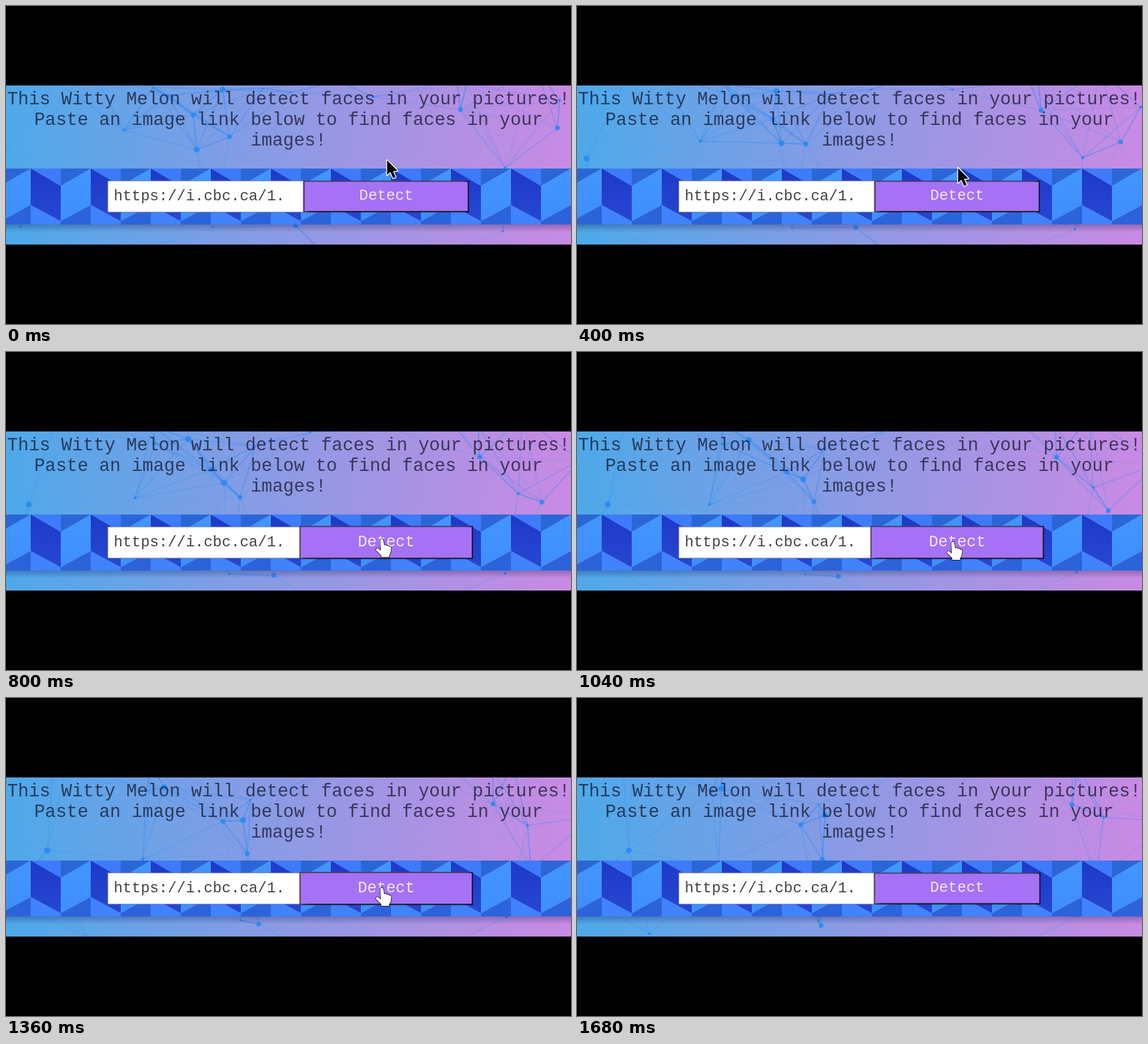
An HTML page with a canvas that plays this animation: 960x540 px, repeating every 1760 ms.

```html
<!DOCTYPE html>
<html lang="en">
<head>
<meta charset="utf-8">
<title>Face detection form</title>
<style>
  html, body { margin: 0; width: 100%; height: 100%; overflow: hidden; background: #000; }
  canvas { display: block; }
</style>
</head>
<body>
<canvas id="stage" width="960" height="540"></canvas>
<script>
const ctx = document.getElementById('stage').getContext('2d');
const LOOP = 1760, STEP = 80;
const PANEL = { top: 134.75, bottom: 405.25 };
const BAND = { top: 276, bottom: 371 };
const MONO = '"Courier New", "Liberation Mono", monospace';
const LINK_RANGE = 205;

let seed = 11;
function random(min, max) {
  seed = (seed * 16807) % 2147483647;
  return min + (max - min) * seed / 2147483647;
}

// Velocities are in px/s.
const particle = (x, y, vx, vy, r = 4) => ({ x, y, vx, vy, r });
const particles = [
  particle(368, 142, -73, 7, 5),
  particle(324, 244, 58, -27, 5),
  particle(318, 185, 37, 18),
  particle(380, 222, 22, 31),
  particle(772, 176, 41, 3),
  particle(937, 207, -33, 60),
  particle(492, 373, -46, 8),
  particle(-6, 259, 56, 0, 5),
  particle(200, 211, 24, 46, 2.5),
  particle(848, 275, 28, -43, 2.5)
];
for (let i = 0; i < 18; i++) {
  const y = i % 3 ? random(100, 165) : random(375, 440);
  particles.push(particle((i + random(0, 1)) * 55, y, random(-45, 45), random(-30, 30), random(1.5, 2.8)));
}

function ease(t, from, to) {
  const u = Math.min(1, Math.max(0, (t - from) / (to - from)));
  return u * u * (3 - 2 * u);
}

function polygon(color, points) {
  ctx.beginPath();
  points.forEach(([x, y]) => ctx.lineTo(x, y));
  ctx.closePath();
  ctx.fillStyle = color;
  ctx.fill();
}

function label(text, x, y, size, color, align = 'center') {
  ctx.font = `${size}px ${MONO}`;
  ctx.textAlign = align;
  ctx.fillStyle = color;
  ctx.fillText(text, x, y);
}

function fade(x0, y0, x1, y1, ...colors) {
  const gradient = ctx.createLinearGradient(x0, y0, x1, y1);
  colors.forEach((color, i) => gradient.addColorStop(i / (colors.length - 1), color));
  return gradient;
}

function drawBackground() {
  ctx.fillStyle = fade(0, 286, 960, 262, '#4da9e9', '#8e9ae4', '#c98ae3');
  ctx.fillRect(0, PANEL.top, 960, PANEL.bottom - PANEL.top);
}

function drawNetwork(t) {
  const nodes = particles.map(p => ({ x: p.x + p.vx * t / 1000, y: p.y + p.vy * t / 1000, r: p.r }));
  ctx.lineWidth = 2.2;
  nodes.forEach((a, i) => {
    for (const b of nodes.slice(i + 1)) {
      const near = 1 - Math.hypot(a.x - b.x, a.y - b.y) / LINK_RANGE;
      if (near <= 0) continue;
      ctx.strokeStyle = `rgba(40,135,240,${0.6 * near})`;
      ctx.beginPath();
      ctx.moveTo(a.x, a.y);
      ctx.lineTo(b.x, b.y);
      ctx.stroke();
    }
  });
  ctx.fillStyle = 'rgba(36,138,245,.85)';
  for (const { x, y, r } of nodes) {
    ctx.beginPath();
    ctx.arc(x, y, r, 0, Math.PI * 2);
    ctx.fill();
  }
}

function drawBand() {
  const { top, bottom } = BAND;
  const half = 51, rise = 29.5, side = top + 2 * rise + 3, front = side + rise - 2;
  ctx.fillStyle = fade(0, bottom, 0, bottom + 13, 'rgba(0,0,50,.26)', 'rgba(0,0,50,0)');
  ctx.fillRect(0, bottom, 960, 13);
  ctx.save();
  ctx.beginPath();
  ctx.rect(0, top, 960, bottom - top);
  ctx.clip();
  const dark = fade(0, top, 0, bottom, '#1d39c8', '#2748d2');
  const light = fade(0, top, 0, bottom, '#4296ff', '#3e8dfb');
  for (let x = -60; x < 960; x += half * 2) {
    const edge = x + half, end = edge + half;
    polygon('#3d7bfb', [[x, top], [edge, top], [edge, top + rise]]);
    polygon('#2b66d8', [[edge, top], [end, top], [edge, top + rise]]);
    polygon(dark, [[x, top], [edge, top + rise], [edge, front], [x, side]]);
    polygon(light, [[edge, top + rise], [end, top], [end, side], [edge, front]]);
    polygon('#4083fc', [[x, side], [edge, front], [edge, bottom], [x, bottom]]);
    polygon('#2c62da', [[end, side], [end, bottom], [edge, bottom], [edge, front]]);
  }
  ctx.restore();
}

function drawForm(t) {
  ctx.fillStyle = '#777b88';
  ctx.fillRect(172.5, 296.5, 333, 54);
  ctx.fillStyle = '#fff';
  ctx.fillRect(173.5, 297.5, 331, 52);
  label('https://i.cbc.ca/1.', 183, 330, 25.5, '#444', 'left');

  const scale = 1 + 0.05 * (ease(t, 480, 640) - ease(t, 1520, 1730));
  const w = 140.5, h = 26.8, border = 2;
  ctx.save();
  ctx.translate(646, 323.4);
  ctx.scale(scale, scale);
  polygon('#4b3c68', [[-w, -h], [w, -h], [-w, h]]);
  polygon('#17101f', [[w, -h], [w, h], [-w, h]]);
  ctx.fillStyle = '#a672f5';
  ctx.fillRect(border - w, border - h, 2 * (w - border), 2 * (h - border));
  label('Detect', 0, 6, 25.5, 'rgba(255,250,255,.85)');
  ctx.restore();
}

const arrow = new Path2D('M0 0V25L5.6 19.8 10.2 30.3 14.4 28.5 10 18.4 17.5 17.8Z');
const hand = new Path2D('M-2.6 2Q0 -2 2.6 2L4 11Q7 9 8.4 12Q11 10.5 12.4 13.4Q16 12.6 16 16L15.2 23Q14.4 26 12.4 28V31H-1V28L-9.6 19.6Q-10.4 15.6 -6.4 16.2L-1.6 20Z');

function drawCursor(t) {
  if (t >= 1600) return;
  const pointing = t >= 560;
  const shape = pointing ? hand : arrow;
  ctx.save();
  ctx.translate(pointing ? 638.5 : 647.5, 262 + 60 * ease(t, 170, 930));
  ctx.lineJoin = 'round';
  ctx.lineWidth = pointing ? 1.8 : 3;
  ctx.strokeStyle = pointing ? '#15101c' : '#fff';
  ctx.fillStyle = pointing ? '#fff' : '#000';
  ctx.stroke(shape);
  ctx.fill(shape);
  ctx.restore();
}

function drawHeading() {
  const lines = [
    'This Witty Melon will detect faces in your pictures!',
    'Paste an image link below to find faces in your',
    'images!'
  ];
  lines.forEach((line, i) => label(line, 480, 166.5 + 35.3 * i, 30.65, 'rgba(14,14,34,.7)'));
}

function render(t) {
  ctx.fillStyle = '#000';
  ctx.fillRect(0, 0, 960, 540);
  ctx.save();
  ctx.beginPath();
  ctx.rect(0, PANEL.top, 960, PANEL.bottom - PANEL.top);
  ctx.clip();
  drawBackground();
  drawNetwork(t);
  drawHeading();
  drawBand();
  drawForm(t);
  drawCursor(t);
  ctx.restore();
}

const start = performance.now();
function tick() {
  const elapsed = (performance.now() - start) % LOOP;
  render(Math.floor(elapsed / STEP) * STEP);
  requestAnimationFrame(tick);
}
tick();
</script>
</body>
</html>
```
